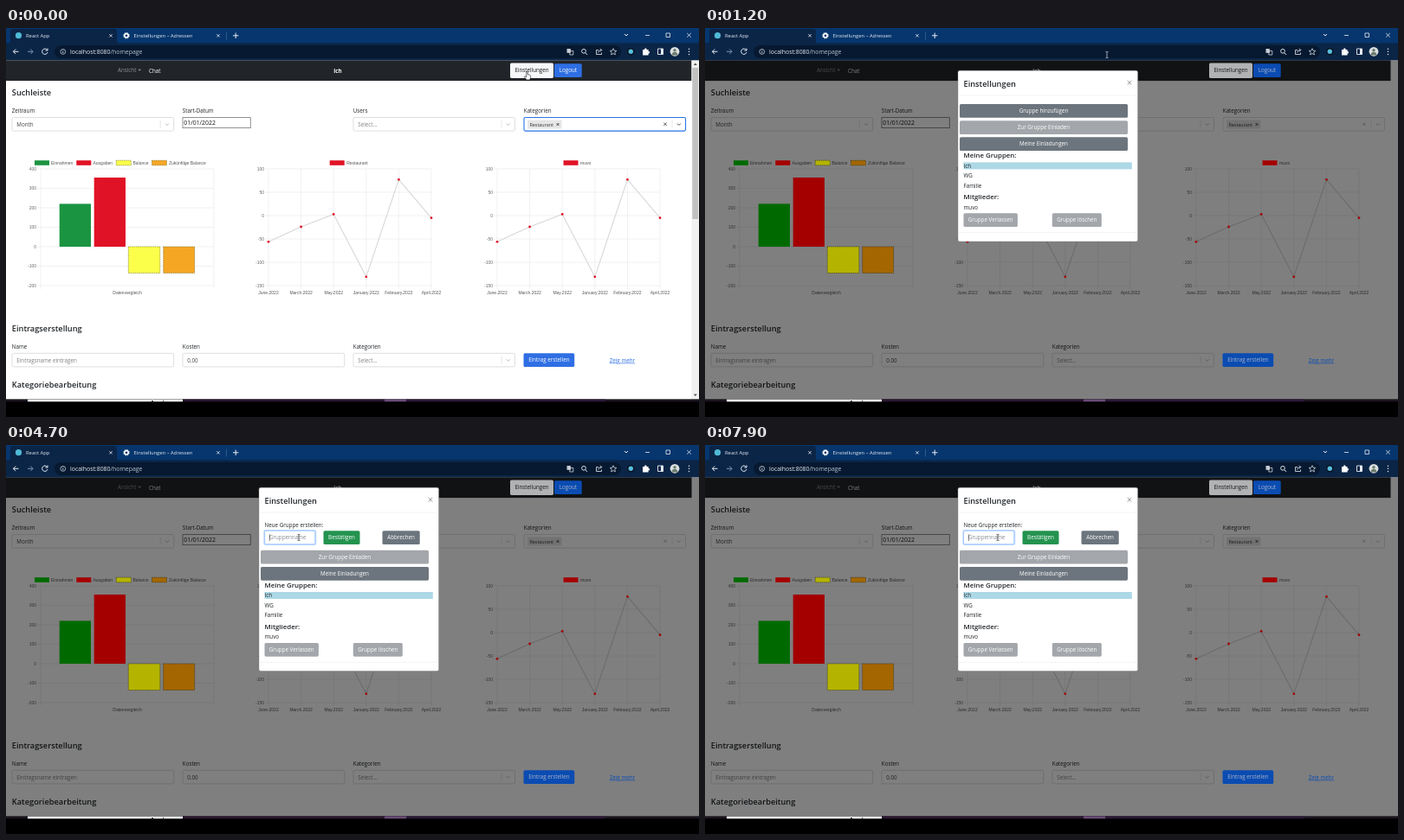
These frames come from a looping animation (800 by 450 pixels, 8 s). An HTML page:

```html
<!DOCTYPE html>
<html lang="de">
<head>
<meta charset="utf-8">
<title>Einstellungen</title>
<style>
html, body { margin: 0; width: 100%; height: 100%; overflow: hidden; background: #000; }
svg { display: block; width: 100%; height: 100%; }
text { font-family: "Open Sans", "Noto Sans", sans-serif; white-space: pre; }
.chart text { font-family: "Liberation Sans", Arial, sans-serif; }
</style>
</head>
<body>
<svg id="stage" viewBox="0 0 800 450"></svg>
<script>
const LOOP = 8000, TICK = 100;
const OPEN_AT = 270, FORM_AT = 2700, FOCUS_AT = 4400, BLINK = 530;
const FORM_SHIFT = 14.6;
const BODY = 6.25, INK = '#212529', PALE = '#808080', GREY = '#6c757d', GREY_OFF = '#a3a6aa';
const MEMBER = 'muvo';

const clamp = v => Math.max(0, Math.min(1, v));
const lerp = (a, b, k) => a + (b - a) * k;

const rect = (x, y, w, h, fill, extra = '') =>
  `<rect x="${x}" y="${y}" width="${w}" height="${h}" fill="${fill}" ${extra}/>`;
const stroke = (d, color, width = .6, extra = '') =>
  `<path d="${d}" fill="none" stroke="${color}" stroke-width="${width}" ${extra}/>`;
const dot = (x, y, r, fill) => `<circle cx="${x}" cy="${y}" r="${r}" fill="${fill}"/>`;
const ring = (x, y, r, color, width = .9) =>
  `<circle cx="${x}" cy="${y}" r="${r}" fill="none" stroke="${color}" stroke-width="${width}"/>`;
const text = (x, y, s, size = BODY, fill = INK, extra = '') =>
  `<text x="${x}" y="${y}" font-size="${size}" fill="${fill}" ${extra}>${s}</text>`;
const heading = (x, y, s, size = 9.25) => text(x, y, s, size, INK, 'font-weight="600"');
const centred = (x, y, s, size, fill) => text(x, y, s, size, fill, 'text-anchor="middle"');
const cross = (x, y, r, color, width = .8) =>
  stroke(`M${x - r} ${y - r}l${2 * r} ${2 * r}m0 ${-2 * r}l${-2 * r} ${2 * r}`, color, width);
const chevron = (x, y, color, r = 2) => stroke(`M${x - r} ${y - r / 2}l${r} ${r}l${r} ${-r}`, color, 1);
const button = (x, y, w, s, fill, color = '#fff', h = 15.8) =>
  rect(x, y, w, h, fill, 'rx="1.6"') + centred(x + w / 2, y + h / 2 + 2.2, s, BODY, color);
const mix = (from, to, k) => `rgb(${from.map((c, i) => Math.round(lerp(c, to[i], k)))})`;

// Cubic ease-out, solved for x by bisection
function easeOut(x) {
  let lo = 0, hi = 1;
  for (let i = 0; i < 24; i++) {
    const s = (lo + hi) / 2;
    if (3 * (1 - s) * s * s * .58 + s ** 3 < x) lo = s; else hi = s;
  }
  return 3 * (1 - lo) * lo * lo + lo ** 3;
}

function browser() {
  const white = '#e8edf4';
  return rect(0, 0, 800, 18, '#06366d') + rect(0, 17.5, 800, 19.8, '#0b2547') +
    '<path d="M2 18q3 0 3-3V4q0-3 3-3h117q3 0 3 3v11q0 3 3 3z" fill="#0b2547"/>' +
    dot(14.5, 8.7, 3.6, '#4fb9d6') + text(23, 11, 'React App', 5.85, white) + cross(121, 8.8, 1.7, white) +
    ring(139, 8.8, 2.2, '#fff', 1.6) + ring(139, 8.8, 3.3, '#fff', 1).replace('/>', ' stroke-dasharray="1.3 1.3"/>') +
    text(147.5, 11, 'Einstellungen – Adressen', 5.85, white) + cross(245, 8.8, 1.7, white) +
    stroke('M254.500 4.500v9', '#5c7ba3', .5) + stroke('M262 8.800h6.400m-3.200-3.200v6.400', white, 1) +
    chevron(716, 8, white, 2) + stroke('M738 8.500h5', white, .8) +
    stroke('M762 6h4.500v4.500h-4.500z', white, .8) + cross(788.5, 8.3, 2.3, white) +
    stroke('M14.500 27.300h-6m2.700-2.800l-2.800 2.800l2.800 2.800', white, 1) +
    stroke('M25 27.300h6m-2.700-2.800l2.800 2.800l-2.800 2.800', '#8194ae', 1) +
    stroke('M47.600 25.500a3.200 3.200 0 1 0 .4 2.500M48 23.500v2.500h-2.500', white, 1) +
    rect(56, 20, 654, 15, '#061930', 'rx="7.5"') +
    ring(65.8, 27.4, 2.9, white, .7) + stroke('M65.800 27v2m0-3.400v.8', white, .8) +
    text(74, 29.8, 'localhost:8080<tspan fill="#b9c3d0">/homepage</tspan>', 6.9, white) +
    rect(647.5, 24, 4.3, 4.8, '#c5ccd6') + stroke('M651 26.500h3.800v4.500h-4z', white, .7) +
    ring(667, 26.8, 2.4, white) + stroke('M668.800 28.700l2.200 2.200', white, 1) +
    stroke('M684 25.500h-2.500v5h6v-2M683.500 28.500q.5-3 4-3m-1.500-1.800l1.800 1.800l-1.800 1.800', white, .8) +
    stroke('M701 23.700l1.100 2.500l2.700.2l-2 1.800l.6 2.700l-2.400-1.400l-2.400 1.400l.6-2.700l-2-1.800l2.700-.2z', white, .7) +
    dot(721.3, 27.3, 4.2, '#0b1320') + dot(721.3, 27.3, 2.7, '#57bfdc') +
    '<path d="M735 25h2q0-1.700 1.300-1.700t1.300 1.700h2v2q1.500 0 1.500 1.200t-1.500 1.200v2h-6.600z" fill="#fff"/>' +
    stroke('M752.500 24h6v6.500h-6z', white, .9) + rect(756, 24, 2.5, 6.5, white) +
    dot(772, 27.3, 5.4, '#d9dfdf') + dot(772, 25.8, 1.7, '#6b7a6c') +
    '<path d="M768.700 31.400q0-3.600 3.300-3.600t3.300 3.600z" fill="#6b7a6c"/>' +
    [24.2, 27.3, 30.4].map(y => dot(788.5, y, .75, white)).join('');
}

function field(x, y, w, s, { select = false, focus = false, color = PALE } = {}) {
  const end = x + w;
  return rect(x, y, w, 15.6, '#fff', focus ? 'rx="1.6" stroke="#2675e8" stroke-width="1.1"'
                                           : 'rx="1.6" stroke="#cfd2d6" stroke-width=".7"') +
    text(x + 5.3, y + 10.2, s, BODY, color) +
    (select ? stroke(`M${end - 15.5} ${y + 3.5}v8.600`, '#ccc', .5) +
              chevron(end - 7.7, y + 8, focus ? '#555' : '#bbb') : '');
}

function lineChart(x0, label, legendX) {
  const values = [-56, -24, 3, -131, 77, -5];
  const months = ['June', 'March', 'May', 'January', 'February', 'April'];
  const px = i => x0 + i * 37.6, py = v => 217 - v * .541;
  let out = '';
  for (let v = 100; v >= -150; v -= 50) {
    out += stroke(`M${x0 - 4} ${py(v)}h192`, '#e3e3e3', .5) +
      text(x0 - 5, py(v) + 1.7, v, 5, '#666', 'text-anchor="end"');
  }
  months.forEach((m, i) => {
    out += stroke(`M${px(i)} 163v139`, '#e3e3e3', .5) + centred(px(i), 307.7, m + '.2022', 5, '#555');
  });
  out += stroke('M' + values.map((v, i) => `${px(i)} ${py(v)}`).join('L'), '#d8d8d8', 1.1);
  return out + text(legendX + 19.5, 158, label, 5, '#555');
}

function barChart() {
  let out = '';
  for (let v = 400; v >= -200; v -= 100) {
    const y = 253 - v * .225;
    out += stroke(`M36 ${y}h204`, '#e3e3e3', .5) + text(35, y + 1.7, v, 5, '#666', 'text-anchor="end"');
  }
  const legend = [[52, 'Einnahmen'], [100.5, 'Ausgaben'], [146.5, 'Balance'], [188, 'Zukünftige Balance']];
  return out + stroke('M40 163v139M240 163v139', '#e3e3e3', .5) + centred(140, 307.7, 'Datenvergleich', 5, '#555') +
    legend.map(([x, s]) => text(x, 158, s, 5, '#555')).join('');
}

function page(t, k) {
  return rect(0, 37, 800, 393, '#fff') + rect(0, 37.3, 791.5, 23.8, '#212529') +
    text(129, 51.3, 'Ansicht', BODY, '#8f9295') + '<path d="M152.300 47.800h3.800l-1.900 2z" fill="#8f9295"/>' +
    text(165, 51.5, 'Chat', BODY, '#fff') + text(378.3, 51.5, 'Ich', BODY, '#fff', 'font-weight="700"') +
    heading(6.8, 78, 'Suchleiste') + heading(6.8, 351, 'Eintragserstellung') +
    heading(6.8, 415.5, 'Kategoriebearbeitung') +
    ['Zeitraum', 'Start-Datum', 'Users', 'Kategorien'].map((s, i) => text(6.8 + i * 197, 97.5, s)).join('') +
    ['Name', 'Kosten', 'Kategorien'].map((s, i) => text(6.8 + i * 197, 370.5, s)).join('') +
    field(7, 103.5, 186.7, 'Month', { select: true, color: '#444' }) +
    rect(204, 103.6, 78.3, 12, '#fff', 'stroke="#777" stroke-width=".8"') +
    text(205.3, 112.1, '01/01/2022', 6.9, '#111') +
    field(401, 103.5, 186.5, 'Select...', { select: true }) +
    field(598, 103.5, 186.5, '', { select: true, focus: t < 200 }) +
    rect(602, 106.5, 39.5, 10, '#e6e6e6', 'rx=".8"') + text(604.5, 113.6, 'Restaurant', 5.4, '#333') +
    cross(637, 111.5, 1.3, '#333', 1) + cross(761, 111.3, 1.7, t < 200 ? '#555' : '#bbb', 1) +
    '<g class="chart">' + barChart() + lineChart(303, 'Restaurant', 373.7) + lineChart(567, MEMBER, 643.5) + '</g>' +
    field(7, 376.3, 186.7, 'Eintragsname eintragen') + field(204, 376.3, 186.7, '0.00', { color: '#444' }) +
    field(401, 376.3, 186.5, 'Select...', { select: true }) +
    (k ? '' : rect(791.5, 37.3, 8.5, 392.7, '#f1f1f1') + rect(792.3, 46, 6.8, 175, '#c1c1c1') +
      '<path d="M793.800 43l2-2.400l2 2.400zM793.800 423.500l2 2.400l2-2.400z" fill="#555"/>') +
    rect(0, 37.3, 800, 392.7, '#000', `opacity="${.5 * k}"`);
}

// Coloured parts keep more saturation than the plain page while it darkens
function accents(k) {
  const green = mix([27, 148, 65], [0, 106, 0], k), red = mix([224, 18, 38], [164, 0, 0], k);
  const yellow = mix([251, 255, 74], [180, 180, 0], k), orange = mix([245, 166, 35], [164, 102, 0], k);
  const blue = mix([47, 111, 228], [11, 76, 178], k), edge = mix([90, 90, 20], [40, 35, 0], k);
  const dash = `stroke="${edge}" stroke-width=".6" stroke-dasharray="1.2 1"`;
  let out = rect(61.7, 203.4, 36.3, 49.6, green) + rect(101.7, 173, 36.3, 80, red) +
    rect(141.3, 253, 36.5, 30.5, yellow, dash) + rect(181.7, 253, 36, 30.5, orange, dash);
  [[33, green], [81.3, red], [127.3, yellow], [168.5, orange], [373.7, red], [643.5, red]]
    .forEach(([x, c], i) => out += rect(x, 153.2, 17, 5.6, c, i === 2 || i === 3 ? dash : ''));
  for (const x0 of [303, 567])
    [-56, -24, 3, -131, 77, -5].forEach((v, i) => out += dot(x0 + i * 37.6, 217 - v * .541, 1.4, red));
  const label = mix([255, 255, 255], [170, 180, 200], k);
  return out + button(582, 40.5, 50, 'Einstellungen', mix([246, 247, 248], [176, 178, 180], k), '#151719', 17.4) +
    button(633, 41.2, 31.7, 'Logout', blue, label) +
    button(597.5, 376.3, 58.7, 'Eintrag erstellen', blue, label) +
    text(696.7, 386.6, 'Zeig mehr', BODY, blue, 'text-decoration="underline"');
}

function modal(t, opacity, lift) {
  const form = t >= FORM_AT, focus = t >= FOCUS_AT, shift = form ? FORM_SHIFT : 0;
  const caret = focus && Math.floor((t - FOCUS_AT) / BLINK) % 2 === 0;
  const hoverAdd = t >= 1900, hoverConfirm = t >= 3100 && t < 3900;
  const top = form
    ? text(298.5, 94.7, 'Neue Gruppe erstellen:') +
      (focus ? rect(297.3, 98, 61, 18, '#c2dbfe', 'rx="2.5"') : '') +
      rect(298.6, 99.2, 58.2, 15.6, '#fff', `rx="1.6" stroke="${focus ? '#86b7fe' : '#ced4da'}" stroke-width=".7"`) +
      text(303.9, 109.4, 'Gruppenname', BODY, '#858b91') +
      (caret ? stroke('M304.300 103.200v7.800', '#222', .6) : '') +
      button(366.5, 99.2, 42, 'Bestätigen', hoverConfirm ? '#1d8248' : '#24934f') +
      button(434.5, 99.2, 43.2, 'Abbrechen', GREY)
    : button(294, 88, 194, 'Gruppe hinzufügen', hoverAdd ? '#565c62' : GREY);
  return `<g opacity="${opacity}" transform="translate(0 ${-lift})">` +
    rect(292, 49.2, 207.6, 197.8 + shift, '#fff', 'rx="2" stroke="#777" stroke-width=".4"') +
    heading(298.5, 67.5, 'Einstellungen') + cross(490, 63.3, 2.3, '#777', .8) +
    stroke('M292.300 78h207', '#e3e6e9', .5) + top + `<g transform="translate(0 ${shift})">` +
    button(294, 107.2, 194, 'Zur Gruppe Einladen', GREY_OFF) +
    button(294, 126.3, 194, 'Meine Einladungen', GREY) +
    heading(298.5, 150.4, 'Meine Gruppen:', 7.85) + rect(298.5, 155.4, 194.3, 8, '#add8e6') +
    text(298.5, 161.7, 'Ich') + text(298.5, 173.2, 'WG') + text(298.5, 184.7, 'Familie') +
    heading(298.5, 198, 'Mitglieder:', 7.85) + text(298.5, 209.6, MEMBER) +
    button(298.5, 214.3, 62.4, 'Gruppe Verlassen', GREY_OFF) + button(400.8, 214.3, 57, 'Gruppe löschen', GREY_OFF) +
    stroke('M292.300 236.700h207', '#e3e6e9', .5) + '</g></g>';
}

// time, x, y
const path = [[0, 602, 55], [700, 602, 55], [1200, 464, 31], [1900, 400, 97], [2800, 400, 97],
              [3300, 380, 103], [3700, 380, 103], [4200, 338, 107], [LOOP, 338, 107]];

function cursor(t) {
  const i = path.findIndex((p, n) => n && t <= p[0]);
  const [ta, xa, ya] = path[i - 1], [tb, xb, yb] = path[i];
  const u = (t - ta) / (tb - ta), k = u * u * (3 - 2 * u);
  const x = lerp(xa, xb, k), y = lerp(ya, yb, k);
  const beam = y < 36 || (t >= 3900);
  const onButton = t <= 700 || t >= 1800;
  const shape = beam
    ? stroke('M-1.500-3.600q1.500 0 1.500.8q0-.8 1.500-.8M0-2.800v5.600M-1.500 3.600q1.500 0 1.500-.8q0 .8 1.500.8',
             y < 36 ? '#dfe5ec' : '#222', .7)
    : onButton
      ? '<path d="M-1.200-4.200q.8-.8 1.400 0v3q2.900 0 3.400 1.500v2.200l-1 2.500h-3.600l-2.600-3.500q.2-1.200 1.400-.5l1 .9z" fill="#fff" stroke="#111" stroke-width=".6"/>'
      : '<path d="M-2-4v8l1.900-1.800l1.300 2.900l1.200-.5l-1.300-2.800h2.600z" fill="#fff" stroke="#111" stroke-width=".5"/>';
  return `<g transform="translate(${x} ${y})">${shape}</g>`;
}

function taskbarEdge() {
  return rect(0, 429.6, 800, 20.4, '#000') + rect(0, 429.6, 800, 2.6, '#1b1420') +
    rect(25, 429.6, 179, 2.6, '#fff') + rect(204, 429.6, 233, 2.6, '#2a1630') +
    rect(437, 429.6, 25, 2.6, '#6b4a78') + rect(462, 429.6, 230, 2.6, '#2b1838') +
    rect(168, 431, 2, 1.2, '#222') + rect(181, 430.6, 1, 1.6, '#444');
}

const stage = document.getElementById('stage');
let shown = -1;

function draw(t) {
  const fade = clamp((t - OPEN_AT) / 150);
  const lift = 20.8 * (1 - easeOut(clamp((t - OPEN_AT) / 300)));
  stage.innerHTML = rect(0, 0, 800, 450, '#000') + page(t, fade) + accents(fade) +
    (fade ? modal(t, fade, lift) : '') + browser() + taskbarEdge() + cursor(t);
}

const start = performance.now();
function frame() {
  const elapsed = Math.max(0, performance.now() - start) % LOOP;
  const t = Math.floor(elapsed / TICK) * TICK;
  if (t !== shown) draw(shown = t);
  requestAnimationFrame(frame);
}
frame();
</script>
</body>
</html>
```
